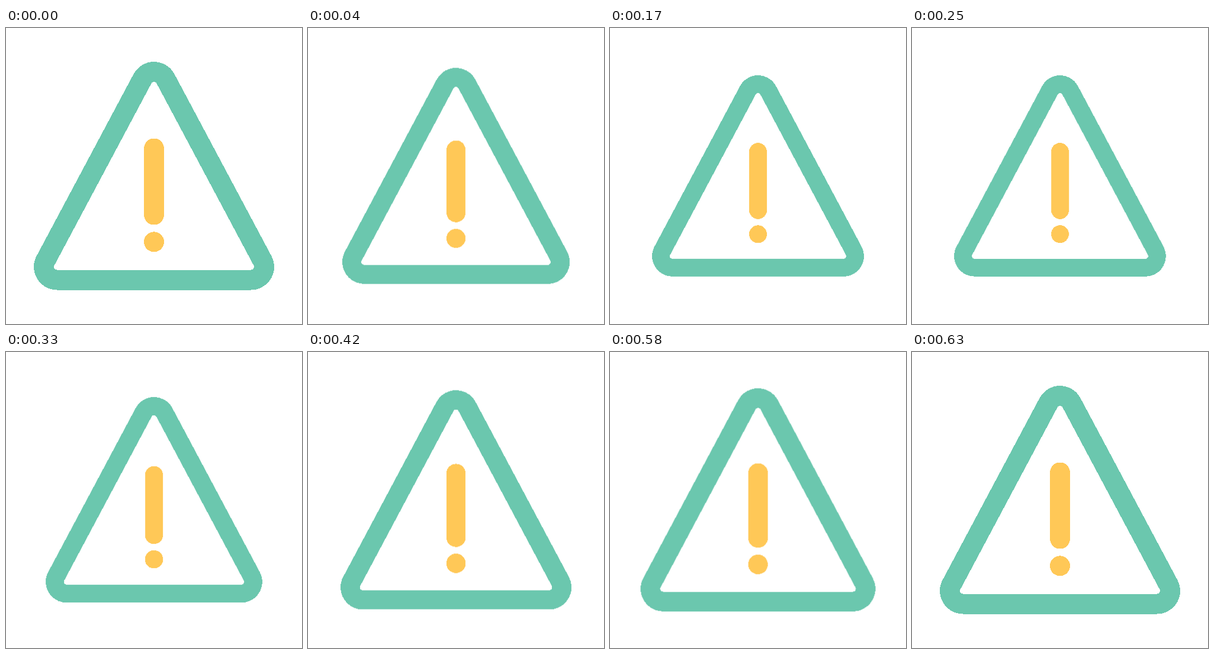
Animation, 500 px wide and 500 px high, one loop 1.54 s. Source, as an HTML page:

```html
<!DOCTYPE html>
<html lang="en">
<head>
<meta charset="utf-8">
<title>Warning pulse</title>
<style>
  html, body { margin: 0; width: 100%; height: 100%; overflow: hidden; background: #fff; }
  svg { display: block; width: 100%; height: 100%; }
  #sign { transform-origin: 250px 250px; shape-rendering: crispEdges; }
</style>
</head>
<body>
<svg viewBox="0 0 500 500">
  <g id="sign" stroke-linejoin="round" stroke-linecap="round">
    <path d="M250 96 414 403.5H86Z" fill="#6bc7ae" stroke="#6bc7ae" stroke-width="78"/>
    <path d="M250 96 414 403.5H86Z" fill="#fff" stroke="#fff" stroke-width="10"/>
    <path d="M250 203.5V315.5" stroke="#ffc857" stroke-width="34"/>
    <circle cx="250" cy="361.3" r="17" fill="#ffc857"/>
  </g>
</svg>
<script>
  const LOOP = 1540;
  const FPS = 24;
  const STEPS = 15;

  // A squeeze followed by a small rebound; times are in steps.
  const dips = [
    { start: 0, low: 5, end: 10.8, depth: 0.12 },
    { start: 10.8, low: 12.9, end: STEPS, depth: 0.0275 }
  ];

  function dipAt(t, { start, low, end, depth }) {
    if (t <= start || t >= end) return 0;
    const u = Math.abs(t - low) / (t < low ? low - start : end - low);
    return depth * (1 - u ** 2.65);
  }

  const scaleAt = t => dips.reduce((s, dip) => s - dipAt(t, dip), 1);

  // Steps fall on whole hundredths of a second.
  const stepTime = i => Math.round(i * 100 / FPS) * 10;

  const frames = Array.from({ length: STEPS + 1 }, (_, i) => ({
    offset: stepTime(i) / LOOP,
    transform: `scale(${scaleAt(i)})`,
    easing: 'steps(1, end)'
  }));
  frames.push({ offset: 1, transform: 'scale(1)' });

  document.getElementById('sign').animate(frames, { duration: LOOP, iterations: Infinity });
</script>
</body>
</html>
```
